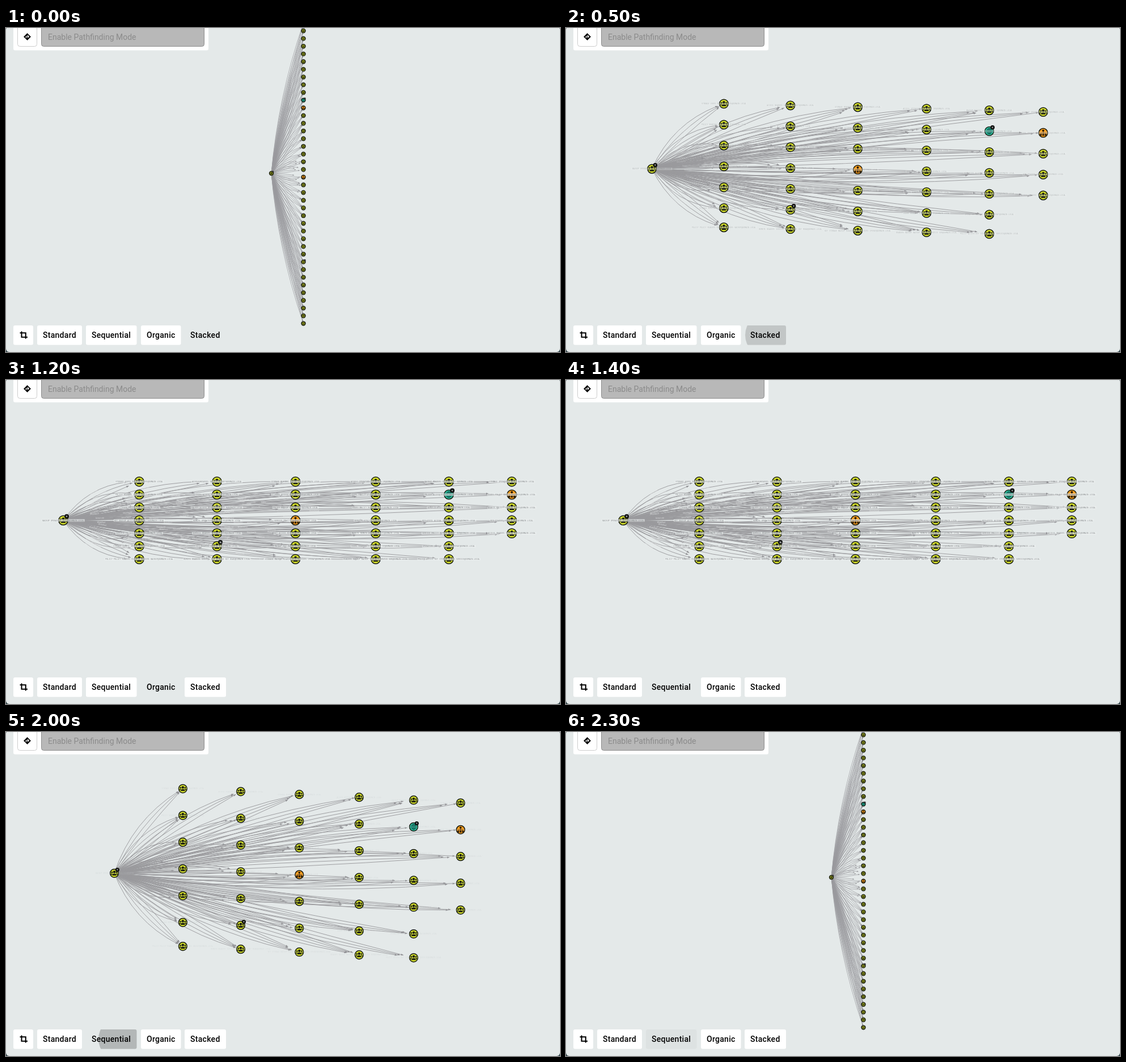
Animation, 977 px wide and 573 px high, one loop 2.4 s. Source, as an HTML page:

```html
<!DOCTYPE html>
<html lang="en">
<head>
<meta charset="utf-8">
<title>Graph layouts</title>
<style>
  html, body { margin: 0; width: 100%; height: 100%; overflow: hidden; background: #33464b; }
  svg { display: block; width: 100vw; height: 100vh; }
  .ui { font-family: Roboto, sans-serif; font-size: 14px; }
  .btn text { font-weight: 500; letter-spacing: .28px; }
  .ring { stroke: #161a12; stroke-width: 1.5; vector-effect: non-scaling-stroke; }
  .tag { font: 3.5px "Noto Sans Mono", monospace; text-anchor: middle; fill: #85898b; }
  .kind { font: 3.4px Roboto, sans-serif; text-anchor: middle; fill: #f0f3f3; }
  .edge { fill: none; stroke: #9a9a9e; }
  .tip { fill: #8f8f93; }
</style>
</head>
<body>
<svg id="stage" viewBox="0 0 977 573" preserveAspectRatio="none">
  <defs>
    <g id="people" fill="#181b0a">
      <circle cy="-2.5" r="2.5"/>
      <path d="M-4 4.5V3Q-4 .7 0 .7T4 3V4.5Z"/>
      <circle cx="-4.6" cy="-1.7" r="1.6"/><circle cx="4.6" cy="-1.7" r="1.6"/>
      <path d="M-7 2.9V1.9Q-6.8.4-3.7.5L-4.8 2.9ZM7 2.9V1.9Q6.8.4 3.7.5L4.8 2.9Z"/>
    </g>
    <g id="tree" fill="#2b1b05">
      <circle cy="-4" r="2"/>
      <path d="M-.5-3H.5V0H5V2H4V1H.5V2H-.5V1H-4V2H-5V0H-.5Z"/>
      <path d="M-6.2 2h3.4v3.4h-3.4ZM-1.7 2h3.4v3.4h-3.4ZM2.8 2h3.4v3.4h-3.4Z"/>
    </g>
    <g id="globe" fill="none" stroke="#0b4a45" stroke-width=".9">
      <circle r="5.2"/><ellipse rx="2.4" ry="5.2"/>
      <path d="M-5.2 0H5.2M0-5.2V5.2M-4.4-2.7H4.4M-4.4 2.7H4.4"/>
    </g>
    <g id="badge"><circle r="4" fill="#111"/><path d="M-1.6-1.2h3.2L0 2Z" fill="#aab0b0"/></g>
  </defs>
  <rect y="-3" width="977" height="576" rx="6" fill="#e4e9e9"/>
  <g id="edges"></g>
  <g id="nodes"></g>
  <g id="kinds"></g>
  <g id="tags"></g>
  <g class="ui">
    <rect x="13" y="-8" width="344" height="47.5" rx="3" fill="#fff"/>
    <rect x="20.5" y="-8.5" width="34" height="41" rx="4" fill="#fff" stroke="#ccc"/>
    <path d="M37.5 9.5L43.5 15.5L37.5 21.5L31.5 15.5Z" fill="#111" stroke="#111" stroke-linejoin="round"/>
    <path d="M35.4 17.8V15H39M38 12.9L40.2 15L38 17.1" fill="none" stroke="#fff" stroke-width="1.2"/>
    <rect x="62.5" y="-8.5" width="287" height="41" rx="4" fill="#b8b8b8" stroke="#8e8e8e"/>
    <text x="74" y="20.7" fill="#8b8b8b">Enable Pathfinding Mode</text>
    <g id="bar" class="btn">
      <rect x="13" y="526" width="35" height="34.5" rx="3" fill="#fff"/>
      <path d="M24.5 539.3H34.7V549.5M27.5 536.5V546.7H38" fill="none" stroke="#000" stroke-width="2.1"/>
    </g>
  </g>
</svg>
<script>
const LOOP = 2400, STEP = 100, COUNT = 40, ZOOM = 2.4;
const COLS = [-275.5, -138.5, 0, 141.5, 270.5, 381.5];
const RELATIONS = ["MemberOf", "GenericAll", "WriteDacl", "WriteOwner", "Owns", "AddMember"];
const WORDS = ["ACCESS", "REMOTE", "BACKUP", "POLICY", "USERS", "SERVICE", "KEY", "OPERATORS", "STORAGE", "READERS"];
const $ = id => document.getElementById(id);

let seed = 11;
const rand = n => (seed = seed * 16807 % 2147483647) % n;
const clamp = v => Math.max(0, Math.min(1, v));
const mix = (a, b, t) => a + (b - a) * t;
const ease = t => t < .5 ? 2 * t * t : 1 - 2 * (1 - t) ** 2;
const zoom = q => 1 + (ZOOM - 1) * q;
const r2 = v => v.toFixed(2);

function add(parent, name, attrs = {}, text) {
  const el = document.createElementNS(parent.namespaceURI, name);
  set(el, attrs);
  if (text) el.textContent = text;
  return parent.appendChild(el);
}
function set(el, attrs) {
  for (const k in attrs) el.setAttribute(k, attrs[k]);
}

// Node -1 is the root; the others fill rows of six, then rows of five.
function makeNode(i) {
  const tail = i >= 30, per = tail ? 5 : 6, j = tail ? i - 30 : i;
  const root = i < 0;
  const node = {
    side: i < COUNT / 2 ? -1 : 1,
    seqX: root ? -56.5 : 0,
    seqY: root ? 0 : (i - 19.5) * 13.62,
    gridX: root ? -409.5 : COLS[j % per],
    gridY: root ? 0 : (Math.floor(j / per) + (tail ? 5 : 0) - 3) * 22.85
  };
  const [fill, icon] = i === 10 ? ["#2cc8a4", "globe"]
    : i === 11 || i === 20 ? ["#f79c1d", "tree"] : ["#d3de2c", "people"];
  node.el = add($("nodes"), "g");
  add(node.el, "circle", { r: 8.2, fill, class: "ring" });
  add(node.el, "use", { href: "#" + icon });
  if (root || i === 10 || i === 31) add(node.el, "use", { href: "#badge", x: 6, y: -7 });

  const size = (i >= 35 ? 38 : 22) + rand(11);
  let name = "";
  while (name.length < size) name += (name && " ") + WORDS[rand(WORDS.length)];
  name = name.slice(0, size).trim() + "@DOMAIN.LOCAL";
  node.tag = add($("tags"), "g");
  const w = name.length * 2.1 + 2;
  add(node.tag, "rect", { x: -w / 2, y: -2.2, width: w, height: 4.4, fill: "#f2f5f5", opacity: .6 });
  add(node.tag, "text", { class: "tag", y: 1.3 }, name);
  return node;
}

const root = makeNode(-1);
const nodes = Array.from({ length: COUNT }, (_, i) => makeNode(i));
nodes.forEach(n => {
  n.line = add($("edges"), "path", { class: "edge" });
  n.tips = add($("edges"), "path", { class: "tip" });
  n.links = Array.from({ length: 3 + rand(2) }, (_, k) => ({
    bow: 40 - k * 16,
    gap: rand(34),
    mid: .38 + rand(20) / 100,
    label: add($("kinds"), "text", { class: "kind" }, RELATIONS[rand(RELATIONS.length)])
  }));
});

const buttons = [["Standard", 55, 79], ["Sequential", 141, 89.5], ["Organic", 238, 70.5], ["Stacked", 315, 73]]
  .map(([label, x, w]) => {
    const box = { x, y: 526, width: w, height: 34.5, rx: 3 };
    add(add($("bar"), "clipPath", { id: label }), "rect", box);
    const bg = add($("bar"), "rect", { ...box, fill: "#fff" });
    const ripple = add($("bar"), "circle", { cy: 543, "clip-path": `url(#${label})` });
    add($("bar"), "text", { x: x + 10, y: 548 }, label);
    return { label, bg, ripple };
  });

function place(n, q) {
  const z = zoom(q), a = (1 - q) * z, b = q * z / ZOOM;
  n.x = 524.5 - 14 * q ** 3.5 + a * n.seqX + b * n.gridX;
  n.y = 257 - 8.7 * q + a * n.seqY + b * n.gridY;
  const transform = `translate(${r2(n.x)} ${r2(n.y)}) scale(${r2(z / ZOOM)})`;
  set(n.el, { transform });
  set(n.tag, { transform });
}

// Parallel links bow sideways by a fixed distance that follows the zoom.
function drawLinks(n, q) {
  const s = zoom(q) / ZOOM;
  const dx = n.x - root.x, dy = n.y - root.y, len = Math.hypot(dx, dy);
  const flat = (dx / len) ** 8;
  const head = 1.2 + 3.2 * s;
  let line = "", tips = "";
  for (const k of n.links) {
    const bow = k.bow * s * n.side / len;
    const cx = root.x + dx / 2 - dy * bow, cy = root.y + dy / 2 + dx * bow;
    const end = 1 - (9 + k.gap * flat) * s / len;
    const at = t => [
      mix(mix(root.x, cx, t), mix(cx, n.x, t), t),
      mix(mix(root.y, cy, t), mix(cy, n.y, t), t)
    ];
    const angle = t => Math.atan2(mix(cy - root.y, n.y - cy, t), mix(cx - root.x, n.x - cx, t));
    const [ex, ey] = at(end), g = angle(end);
    const ux = Math.cos(g) * head, uy = Math.sin(g) * head;
    line += `M${r2(root.x)} ${r2(root.y)}Q${r2(mix(root.x, cx, end))} ${r2(mix(root.y, cy, end))} ${r2(ex)} ${r2(ey)}`;
    tips += `M${r2(ex)} ${r2(ey)}L${r2(ex - ux - uy * .4)} ${r2(ey - uy + ux * .4)}L${r2(ex - ux + uy * .4)} ${r2(ey - uy - ux * .4)}Z`;
    const [lx, ly] = at(k.mid);
    set(k.label, { transform: `translate(${r2(lx)} ${r2(ly + 1)}) rotate(${r2(angle(k.mid) * 180 / Math.PI)}) scale(${r2(s)})` });
  }
  set(n.line, { d: line, "stroke-width": r2(.35 + .6 * Math.min(1, s * 1.4)) });
  set(n.tips, { d: tips });
}

function press(button, age, cx, r0) {
  const on = age >= 0 && age < 450;
  set(button.ripple, {
    cx, r: on ? r0 + age * (age > 200 ? .25 : .1) : 0,
    opacity: on ? clamp(.27 - .0006 * age) : 0
  });
}

function render(t) {
  const q = ease(clamp((t - 280.5) / 280)) - ease(clamp((t - 1918) / 280));
  [root, ...nodes].forEach(n => place(n, q));
  nodes.forEach(n => drawLinks(n, q));
  const shown = clamp((q - .78) / .22) ** 1.3;
  set($("tags"), { opacity: shown });
  set($("kinds"), { opacity: shown * .8 });

  const hover = t < 1200 ? "Stacked" : t < 1400 ? "Organic" : "Sequential";
  buttons.forEach(b => set(b.bg, { opacity: b.label === hover ? 0 : 1 }));
  press(buttons[3], t - 300, 355, 19);
  press(buttons[1], t - 1900, 201, 28);
}

const start = performance.now();
let last = -1;
function tick() {
  const t = Math.floor((performance.now() - start) % LOOP / STEP) * STEP;
  if (t !== last) render(last = t);
  requestAnimationFrame(tick);
}
tick();
</script>
</body>
</html>
```
